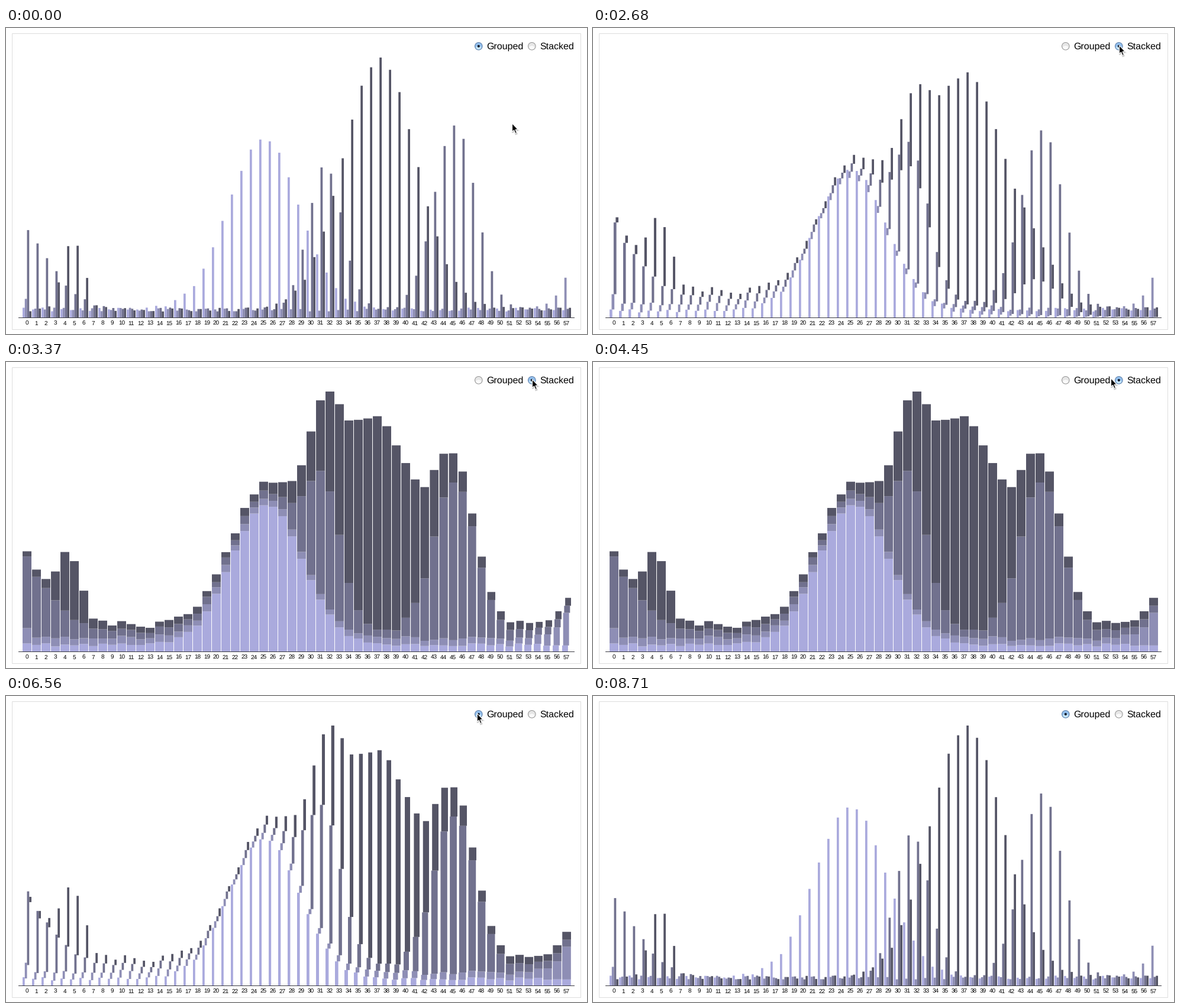
Animation of 982 by 518 pixels, one loop 9440 ms. Source, as a matplotlib script:

```python
import numpy as np
import matplotlib.pyplot as plt
from matplotlib.animation import FuncAnimation
from matplotlib.collections import PolyCollection
from matplotlib.patches import Circle, Ellipse, Polygon, Rectangle

plt.rcParams["text.hinting"] = "none"

W, H, DPI = 982, 518, 64
PX = 72 / DPI                      # points per pixel
LOOP, INTERVAL = 9440, 40
LAYERS, COLS = 4, 58
BASE, PLOT_H = 490, 440
LEFT, PITCH, BAND = 28, 16, 15
THIN = BAND / LAYERS
PRESS_STACKED, PICK_STACKED, TO_STACKED = 1930, 2080, 2042
PRESS_GROUPED, PICK_GROUPED, TO_GROUPED = 5790, 5940, 5900

# The picture is only refreshed in bursts: (first, last, count) in ms.
BURSTS = [(0, 0, 1), (750, 1340, 5), (1930, 2830, 7), (3010, 3370, 3),
          (3550, 3700, 2), (4300, 5040, 6), (5790, 6710, 7),
          (6880, 7510, 5), (8410, 8710, 3)]
STEPS = np.concatenate([np.linspace(*b) for b in BURSTS])

# Bumps of each layer: (centre, width, height), over low random noise.
BUMPS = [
    [(25.35, 5.29, 291)],
    [(-2, 1.58, 74), (64.6, 4.24, 1325)],
    [(-2.3, 5.35, 167), (31.4, 2.51, 246), (45.1, 3.13, 313)],
    [(4.55, 1.58, 118), (36.9, 5.46, 427)],
]

col = np.arange(COLS)
layer = np.arange(LAYERS)[:, None]

heights = np.random.default_rng(4).uniform(10, 17, (LAYERS, COLS))
for row, bumps in zip(heights, BUMPS):
    for centre, width, height in bumps:
        row += height * np.exp(-((col - centre) / width) ** 2)
heights *= PLOT_H / heights.max()
totals = heights.cumsum(axis=0)
scale = PLOT_H / totals.max()


# -------------------------------------------------------------- motion
def ease(t):
    t = np.clip(t, 0, 1)
    return np.where(t < .5, 4 * t ** 3, 1 - 4 * (1 - t) ** 3)


def phase(elapsed):
    return ease((elapsed - 10 * col) / 500)


def bars(t):
    """Corner points of all bars: stacking moves y first, grouping x first."""
    if t < PRESS_GROUPED:
        e = t - TO_STACKED
        ky, kx = phase(e), phase(e - 500)
    else:
        e = t - TO_GROUPED
        kx, ky = 1 - phase(e), 1 - phase(e - 500)
    x = LEFT + PITCH * col + THIN * layer * (1 - kx)
    w = THIN + (BAND - THIN) * kx
    size = heights * (1 + (scale - 1) * ky)
    top = BASE - heights * (1 - ky) - totals * scale * ky
    xs = np.stack([x, x + w, x + w, x], -1)
    ys = np.stack([top, top, top + size, top + size], -1)
    return np.stack([xs, ys], -1).reshape(-1, 4, 2)


def cursor_tip(t):
    if t < 4250:
        k = ease((t - 600) / 740)
        return 855.5 + 34 * k, 161.5 - 132 * k
    if t < 8300:
        k = ease((t - 4150) / 890)
        return 889.5 - 93.2 * k, 29.5 - 4 * np.sin(np.pi * k)
    k = np.clip((t - 8300) / 260, 0, 1)
    return 796.3 + 125 * k, 29.5 + 475 * k ** 1.3


# --------------------------------------------------------------- stage
fig = plt.figure(figsize=(W / DPI, H / DPI), dpi=DPI, facecolor="white")
ax = fig.add_axes([0, 0, 1, 1])
ax.set(xlim=(0, W), ylim=(H, 0))
ax.axis("off")


def label(x, y, text, size, align):
    ax.text(x, y, text, fontsize=size * PX, family="Liberation Sans",
            color="black", ha=align, va="baseline", zorder=4)


ax.add_patch(Rectangle((10.5, 9.5), 961, 501, fill=False, ec="#dddddd",
                       lw=PX, snap=False))

mix = layer / (LAYERS - 1)
ramp = (np.array([170, 170, 221]) * (1 - mix) + np.array([85, 85, 102]) * mix) / 255
rects = PolyCollection(bars(0), facecolors=np.repeat(ramp, COLS, axis=0),
                       edgecolors="none", linewidths=0, zorder=2)
rects.set_snap(False)
ax.add_collection(rects, autolim=False)

ax.add_patch(Rectangle((21, BASE), 940, 1, fc="#3a3a42", lw=0, snap=False, zorder=3))
for i in col:
    label(LEFT + BAND / 2 + PITCH * i, 503.1, str(i), 10, "center")


class Radio:
    LOOKS = {"off": ("#e6e6e6", "#fafafa", "#959595"),
             "on": ("#93bfec", "#c6e6fc", "#5f7fa8"),
             "down": ("#c8c8c8", "#dadada", "#8c8c8c")}

    def __init__(self, x, text):
        y = 30.8
        self.disc = ax.add_patch(Circle((x, y), 6.3, lw=PX, zorder=5))
        self.shine = ax.add_patch(Ellipse((x, y + 2.4), 9, 6, lw=0, zorder=6))
        self.dot = ax.add_patch(Circle((x, y), 2.1, fc="#101828", lw=0, zorder=7))
        label(x + 13.2, 35.4, text, 16, "left")

    def show(self, look):
        face, shine, edge = self.LOOKS[look]
        self.disc.set(facecolor=face, edgecolor=edge)
        self.shine.set_facecolor(shine)
        self.dot.set_visible(look == "on")


grouped, stacked = Radio(798.8, "Grouped"), Radio(888.8, "Stacked")
ring = ax.add_patch(Circle((0, 0), 10, fill=False, ec="black", lw=1.1 * PX, zorder=8))

ARROW = np.array([(0, 0), (0, 14.2), (3.1, 11.3), (5.5, 17), (7.9, 16),
                  (5.5, 10.5), (9.7, 10.2)])
shadow = [ax.add_patch(Polygon(ARROW, fc="black", ec="black", lw=w * PX,
                               alpha=.1, zorder=9)) for w in (.5, 2.5)]
arrow = ax.add_patch(Polygon(ARROW, fc="black", ec="white", lw=1.1 * PX, zorder=10))


def update(n):
    now = (n + 1) * INTERVAL - 1
    t = STEPS[np.searchsorted(STEPS, now, side="right") - 1]
    rects.set_verts(bars(t))

    is_stacked = PICK_STACKED <= t < PICK_GROUPED
    grouped.show("off" if is_stacked else "on")
    stacked.show("on" if is_stacked else "off")
    press_s = PRESS_STACKED <= t < PICK_STACKED
    press_g = PRESS_GROUPED <= t < PICK_GROUPED
    if press_s:
        stacked.show("down")
    if press_g:
        grouped.show("down")
    ring.set_visible(press_s or press_g)
    ring.center = (888.5 if press_s else 798.2, 28.8)

    tip = np.array(cursor_tip(t), dtype=float)
    arrow.set_xy(ARROW + tip)
    for s in shadow:
        s.set_xy(ARROW + tip + (.4, 1.6))
    for part in (arrow, *shadow):
        part.set_visible(t < STEPS[-1])
    return [rects, ring, arrow, *shadow]


anim = FuncAnimation(fig, update, frames=LOOP // INTERVAL, interval=INTERVAL,
                     init_func=lambda: update(0), repeat=True, repeat_delay=0)
plt.show()
```
